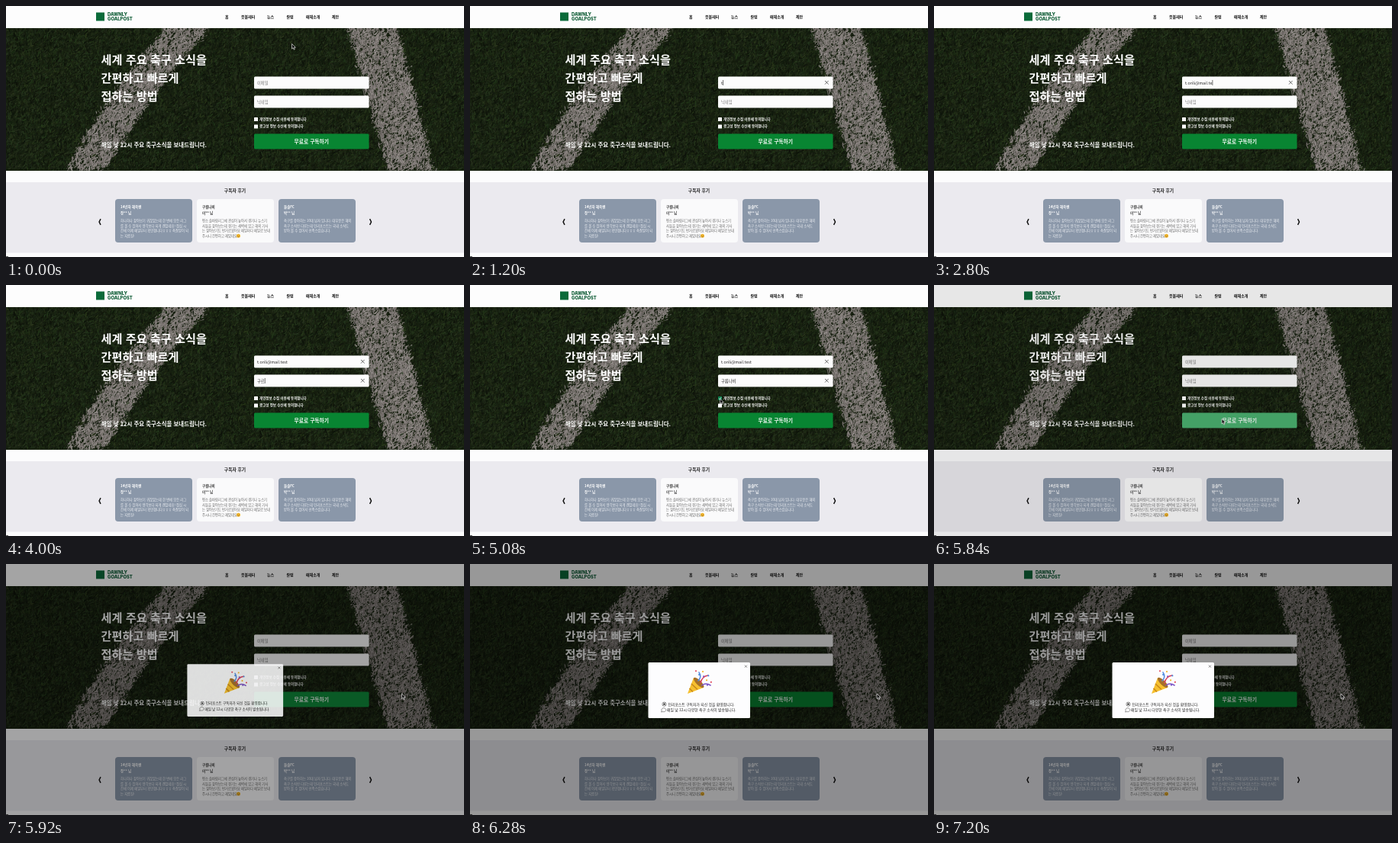
An HTML page with a canvas that plays this animation: 600x329 px, repeating every 7320 ms.

```html
<!DOCTYPE html>
<html lang="ko">
<head>
<meta charset="utf-8">
<style>
  html, body { margin: 0; width: 100%; height: 100%; overflow: hidden; background: #fdfdfd; }
  canvas, svg { position: absolute; left: 0; top: 0; width: 600px; height: 329px; }
  canvas { top: 29px; height: 187px; }
  text { font-family: "Noto Sans CJK KR", "Noto Sans CJK", "Noto Sans", sans-serif; font-weight: 500; white-space: pre; }
  .b text, text.b { font-weight: 700; }
  .logo text { font-family: Inter, sans-serif; font-weight: 800; }
  .mid { text-anchor: middle; }
</style>
</head>
<body>
<canvas id="grass" width="600" height="187"></canvas>
<svg viewBox="0 0 600 329">
  <!-- header -->
  <rect width="600" height="29" fill="#fdfdfd"/>
  <rect x="118" y="8.5" width="11" height="11" fill="#0b6b3a"/>
  <g class="logo" font-size="5.9" fill="#0b5a33">
    <text x="133" y="13.2">DAWNLY</text>
    <text x="133" y="19.2">GOALPOST</text>
  </g>
  <g class="b" font-size="5" fill="#111">
    <text x="287" y="16.4">홈</text><text x="308" y="16.4">풋볼레터</text>
    <text x="342" y="16.4">뉴스</text><text x="367.5" y="16.4">칼럼</text>
    <text x="393" y="16.4">매체소개</text><text x="427" y="16.4">제안</text>
  </g>

  <!-- hero -->
  <g class="b" font-size="15.2" fill="#fff">
    <text x="124.5" y="75.7">세계 주요 축구 소식을</text>
    <text x="124.5" y="99.7">간편하고 빠르게</text>
    <text x="124.5" y="123.7">접하는 방법</text>
  </g>
  <text class="b" x="125" y="185" font-size="7.45" fill="#fff">매일 낮 12시 주요 축구소식을 보내드립니다.</text>
  <g id="fields"></g>
  <g id="checks"></g>
  <g font-size="4.5" fill="#fff" class="b">
    <text x="332" y="149.8">개인정보 수집 이용에 동의합니다</text>
    <text x="332" y="159.4">광고성 정보 수신에 동의합니다</text>
  </g>
  <rect id="button" x="325" y="167.5" width="150.5" height="20" rx="1.5"/>
  <text class="b mid" x="400.3" y="180.3" font-size="6.75" fill="#fff">무료로 구독하기</text>

  <!-- reviews -->
  <rect y="216" width="600" height="113" fill="#fcfcfd"/>
  <rect y="231" width="600" height="92.5" fill="#ebeaef"/>
  <text class="b mid" x="300" y="244" font-size="5.8" fill="#222">구독자 후기</text>
  <g id="cards"></g>
  <circle cx="304.5" cy="301.3" r="2.5" fill="#f5b92e"/>
  <path d="M303.4 300.6h.5M305.1 300.6h.5M303.2 301.8q1.3 1.6 2.6 0" stroke="#5b3510" stroke-width=".5" fill="none"/>
  <path d="M124 279.2l-1.9 3.8 1.9 3.8M476.6 279.2l1.9 3.8-1.9 3.8" fill="none" stroke="#111" stroke-width="1.5"/>
  <path d="M0 328.5h3" stroke="#555"/>

  <!-- dialog -->
  <rect id="shade" width="600" height="329"/>
  <g id="dialog">
    <rect x="233.5" y="129" width="133.5" height="73" rx="1.5" fill="#fdfdfe"/>
    <path d="M359.9 132.7l3 3m0-3l-3 3" stroke="#444" stroke-width=".6"/>
    <path d="M285 170L293 149Q303 152 306 162Z" fill="#f6c02f"/>
    <path d="M290 157l8 7.5M287.5 163l4.5 4.5" stroke="#c98a1b" stroke-width="1.6"/>
    <ellipse cx="299.7" cy="155.5" rx="3.2" ry="9" transform="rotate(-45 299.7 155.5)" fill="#a5702a"/>
    <g fill="none" stroke-width="1.6" stroke-linecap="round">
      <path d="M299 153q5-5 1-11" stroke="#5b8fe0"/>
      <path d="M302 156q2-9 10-10" stroke="#d9435e"/>
      <path d="M304 159q5-4 11 0" stroke="#7d55c7"/>
    </g>
    <g id="confetti"></g>
    <g fill="#fff" stroke="#333" stroke-width=".5">
      <circle cx="254.5" cy="183.7" r="2.6"/>
      <circle cx="254.5" cy="183.7" r=".9" fill="#222"/>
      <path d="M253 181.6l.8.7M256 181.6l-.8.7M252.6 185.2l.9-.5M256.4 185.2l-.9-.5" stroke-width=".8"/>
      <path d="M250.5 194l.8-1.5a2.9 2.5 0 1 1 1.5 1.1z"/>
    </g>
    <g font-size="4.85" fill="#222">
      <text x="259.5" y="185.6">던리포스트 구독자가 되신 것을 환영합니다.</text>
      <text x="258" y="193.2">매일 낮 12시 다양한 축구 소식이 발송됩니다.</text>
    </g>
  </g>
  <path id="pointer" d="M0 0v6.6l1.6-1.4 1.1 2.5 1.1-.5-1-2.4h2.1z" fill="#111" stroke="#fff" stroke-width=".6"/>
</svg>

<script>
const LOOP = 7320;
const $ = id => document.getElementById(id);
const clamp = v => Math.max(0, Math.min(1, v));
const ramp = (t, from, to) => clamp((t - from) / (to - from));

let seed = 7;
const rand = () => (seed = seed * 16807 % 2147483647) / 2147483647;

function paintGrass() {
  const c = $('grass').getContext('2d');
  c.fillStyle = '#172010';
  c.fillRect(0, 0, 600, 187);
  // Two chalk lines, each given by its left edge and width at depth k
  const onLine = (x, y) => {
    const k = y / 187, bow = 8 * Math.sin(k * Math.PI);
    const left = 210 - 132 * k - bow, right = 446 + 54 * k;
    return x > left && x < left + 57 - 5 * k || x > right && x < right + 65 - 5 * k;
  };
  for (let i = 0; i < 42000; i++) {
    const x = rand() * 600, y = rand() * 187;
    const chalk = onLine(x + (rand() - .5) * 7, y) && rand() < .95;
    const angle = -1.1 + (rand() - .5) * 2, len = 2 + rand() * 4;
    c.strokeStyle = chalk ? `hsl(20 4% ${40 + rand() * 18}%)`
                          : `hsl(${85 + rand() * 20} ${24 + rand() * 14}% ${5 + rand() * 12}%)`;
    c.lineWidth = .6 + rand() * .9;
    c.beginPath();
    c.moveTo(x, y);
    c.lineTo(x + len * Math.cos(angle), y + len * Math.sin(angle));
    c.stroke();
  }
}

const reviews = [
  ['14년차 해축팬', '장** 님', '하나하나 찾아보기 귀찮았는데 한 번에 모든 리그',
    '를 볼 수 있어서 생각보다 되게 괜찮네요! 점심 시', '간에 이제 메일부터 확인합니다ㅎㅎㅎ 축잘알이 되', '는 지름길!'],
  ['구름나비', '이** 님', '평소 솔바람리그에 관심이 높아서 경기나 뉴스기',
    '사들을 찾아보는데 경기는 새벽에 있고 해외 기사', '는 찾아보기도 번거로웠어요 매일마다 메일로 보내', '주시니 간편하고 재밌네요!'],
  ['들솔FC', '박** 님', '축구를 좋아하는 10대 남자 입니다. 대부분은 해외',
    '축구 소식만 다루는데 던리포스트는 국내 소식도', '받아 볼 수 있어서 만족스럽습니다.']
];
$('cards').innerHTML = reviews.map(([title, name, ...lines], i) => {
  const x = 143 + i * 107, light = i === 1;
  const [card, head, body] = light ? ['#fafafb', '#333', '#666'] : ['#8a97a9', '#fff', '#eef0f4'];
  return `<rect x="${x}" y="253" width="101" height="57" rx="4" fill="${card}"/>
    <g class="b" fill="${head}" font-size="4.5">
      <text x="${x + 7}" y="265.3">${title}</text><text x="${x + 7}" y="272.5">${name}</text>
    </g>
    <g fill="${body}" font-size="4.3">
      ${lines.map((s, n) => `<text x="${x + 7}" y="${283 + n * 6.6}">${s}</text>`).join('')}
    </g>`;
}).join('');

$('confetti').innerHTML = ['#e34b5f', '#4f8fe0', '#f2b52c', '#7a56c8', '#4f8fe0', '#f2b52c', '#e34b5f', '#7a56c8']
  .map((color, i) => {
    const a = -1.75 + i * .27, r = i % 2 ? 12 : 17;
    return `<circle cx="${299 + r * Math.cos(a)}" cy="${157 + r * Math.sin(a)}" r="1.1" fill="${color}"/>`;
  }).join('');

function addGroup(parent, markup) {
  const g = document.createElementNS('http://www.w3.org/2000/svg', 'g');
  g.innerHTML = markup;
  $(parent).append(g);
  return g.children;
}
const show = (el, on) => el.style.display = on ? '' : 'none';

function makeField(y, hint) {
  const [, text, caret, clear] = addGroup('fields', `
    <rect x="325" y="${y}" width="150.5" height="16" rx="1.5" fill="#fcfcfc"/>
    <text x="329" y="${y + 10}" font-size="5.3" style="font-weight:400"></text>
    <path d="M0 ${y + 4.5}v7" stroke="#111" stroke-width=".6"/>
    <path d="M465 ${y + 5.5}l4.6 4.6m0-4.6l-4.6 4.6" stroke="#444" stroke-width=".8"/>`);
  return (value, focused) => {
    text.textContent = value || hint;
    text.setAttribute('fill', value ? '#222' : '#777');
    const end = value ? text.getComputedTextLength() : 0;
    caret.setAttribute('transform', `translate(${329.5 + end})`);
    show(caret, focused);
    show(clear, value);
  };
}
const setEmail = makeField(92.5, '이메일');
const setNick = makeField(117.5, '닉네임');

function makeCheck(y) {
  const [box, tick] = addGroup('checks', `
    <rect x="325" y="${y}" width="5" height="5" rx=".5"/>
    <path d="M326 ${y + 2.5}l1.2 1.3 1.9-2.6" fill="none" stroke="#fff" stroke-width=".7"/>`);
  return on => {
    box.setAttribute('fill', on ? '#0a7d4c' : '#fff');
    show(tick, on);
  };
}
const checkTerms = makeCheck(146), checkAds = makeCheck(155.5);

const address = 't.orili@mail.test';
const nickSteps = ['ㄱ', '구', '굴', '구르', '구름', '구름ㄴ', '구름나', '구름납', '구름나비'];

const pointerPath = [
  [0, 374.5, 49.5], [720, 374.5, 49.5], [1040, 345, 99], [3240, 345, 99], [3520, 345, 125],
  [4740, 345, 125], [5000, 327.5, 149], [5160, 327.5, 149], [5320, 327.5, 158],
  [5440, 327.5, 158], [5680, 377, 175.5], [5850, 377, 175.5], [5920, 518.5, 170], [6160, 533, 170], [LOOP, 533, 170]
];
function pointerAt(t) {
  const i = pointerPath.findIndex(p => p[0] > t);
  const [t0, x0, y0] = pointerPath[i - 1], [t1, x1, y1] = pointerPath[i];
  let k = ramp(t, t0, t1);
  k = k * k * (3 - 2 * k);
  return [x0 + (x1 - x0) * k, y0 + (y1 - y0) * k];
}

function draw(t) {
  const open = t < 5810;
  const typed = t < 1160 ? 0 : t < 1480 ? 1 : 2 + Math.floor((t - 1480) / 100);
  setEmail(open ? address.slice(0, typed) : '', t >= 1060 && t < 3540);
  const step = Math.min(nickSteps.length - 1, Math.floor((t - 3720) / 90));
  setNick(open && step >= 0 ? nickSteps[step] : '', t >= 3540 && t < 5040);
  checkTerms(open && t >= 5040);
  checkAds(open && t >= 5360);

  const hover = ramp(t, 5600, 5720) * (1 - ramp(t, 5860, 5930));
  $('button').setAttribute('fill', `rgb(${8 + 66 * hover},${133 + 43 * hover},${50 + 62 * hover})`);

  $('shade').setAttribute('opacity', .4 * ramp(t, 5815, 5935));
  const pop = ramp(t, 5860, 5950), scale = .82 + .18 * pop;
  $('dialog').setAttribute('opacity', clamp(pop * 1.28));
  $('dialog').setAttribute('transform', `translate(300.2 165.7) scale(${scale}) translate(-300.2 -165.7)`);

  const typing = t >= 1160 && t < 3240 || t >= 3720 && t < 4700;
  show($('pointer'), !typing);
  $('pointer').setAttribute('transform', `translate(${pointerAt(t)})`);
}

paintGrass();
const start = performance.now();
(function tick() {
  draw((performance.now() - start) % LOOP);
  requestAnimationFrame(tick);
})();
</script>
</body>
</html>
```
